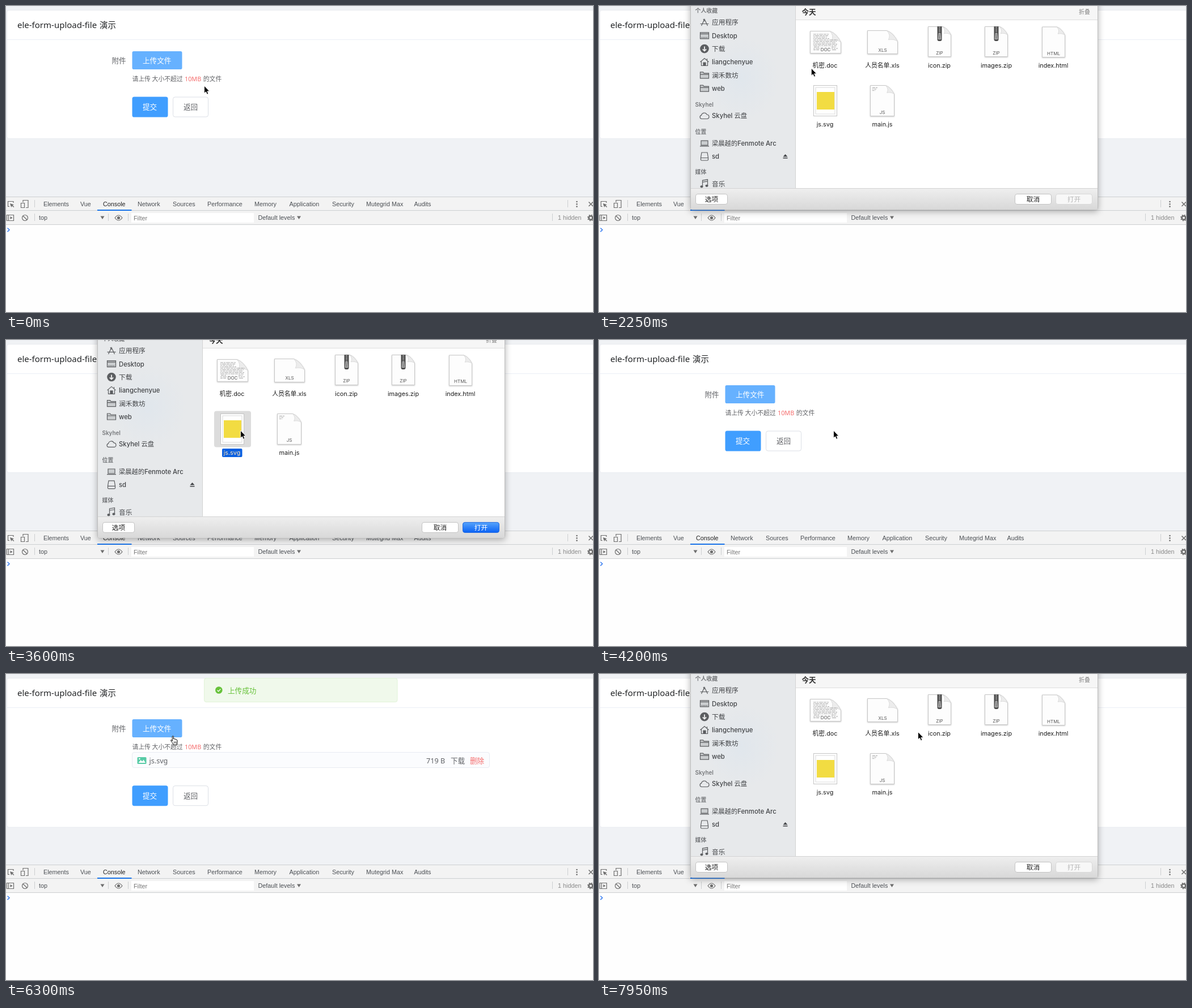
Write an HTML page that moves like this. It is 1035x541 px and loops after 8000 ms.

```html
<!DOCTYPE html>
<html lang="zh">
<head>
<meta charset="utf-8">
<title>ele-form-upload-file</title>
<style>
html, body { margin: 0; width: 100%; height: 100%; overflow: hidden; background: #f0f2f5; }
svg { display: block; width: 100%; height: 100%; }
text { white-space: pre; }
.ui { font: 12.6px "Noto Sans", "Noto Sans CJK SC", sans-serif; fill: #606266; }
.ui .tip { font-size: 10.8px; }
.ui .strong { font-weight: 500; }
.dev { font: 10.8px "Liberation Sans", Arial, sans-serif; fill: #4b4f54; }
.mac { font: 11.3px Inter, "Noto Sans CJK SC", sans-serif; }
.mac .cjk { font-size: 11.7px; }
.mac .head { font-size: 9.9px; font-weight: 600; fill: #77797c; }
.mac .file { font-size: 10.8px; fill: #1c1c1c; text-anchor: middle; }
.mac .kind { font-size: 8px; fill: #555; text-anchor: middle; }
.mac .mid { text-anchor: middle; }
#side { color: #7c7c7c; font-weight: 500; }
#side text:not(.head) { fill: currentColor; }
#side .ico { fill: none; stroke: currentColor; stroke-width: 1.2; }
#sideBg { fill: #f4f4f4; }
#bar { fill: #f5f5f5; }
#body { fill: #fafafa; }
.active #side { color: #434548; }
.active #side .ico { color: #5c5e61; }
.active #sideBg { fill: #e7e9eb; }
.active #bar { fill: url(#barGrad); }
.active #body { fill: #fff; }
#files, #glow { visibility: hidden; }
.active #files, .active #glow { visibility: visible; }
.picked { display: none; }
.chosen .picked { display: inline; }
.chosen .off { display: none; }
</style>
</head>
<body>
<svg viewBox="0 0 1035 541">
  <defs>
    <linearGradient id="barGrad" x2="0" y2="1"><stop stop-color="#efefef"/><stop offset="1" stop-color="#d8d8d8"/></linearGradient>
    <linearGradient id="blue" x2="0" y2="1"><stop stop-color="#56a3fb"/><stop offset="1" stop-color="#0a62f5"/></linearGradient>
    <radialGradient id="haze"><stop stop-color="#dfe6ed" stop-opacity=".8"/><stop offset="1" stop-color="#dfe6ed" stop-opacity="0"/></radialGradient>
  </defs>
  <rect width="1035" height="541" fill="#f0f2f5"/>

  <g class="ui">
    <rect id="card" x="1.5" y="7.5" width="1050" height="227" rx="3.6" fill="#fff" stroke="#e9ebf0"/>
    <path d="M2 59.5H1035" stroke="#ebeef5"/>
    <g fill="#222426">
      <text x="20" y="39.3" font-size="15">ele-form-upload-file</text>
      <text x="165" y="39.3" font-size="14.4">演示</text>
    </g>
    <text x="186.5" y="100.8">附件</text>
    <rect x="222.5" y="80" width="88" height="32" rx="2.8" fill="#66b1ff"/>
    <text x="241" y="100.8" class="strong" fill="#fff">上传文件</text>
    <text x="222.4" y="133" class="tip">请上传 大小不超过</text>
    <text x="315" y="133" class="tip" fill="#f56c6c">10MB</text>
    <text x="347.8" y="133" class="tip">的文件</text>
    <g id="row">
      <rect x="222.5" y="138.5" width="630" height="27" rx="3.6" fill="#fbfcfe" stroke="#e8ebf2"/>
      <rect x="231.5" y="147" width="16" height="12" rx="1.5" fill="#58cba6"/>
      <path d="M233.5 157l4-5 2.6 2.8 2.4-3.4 3.4 5.6z" fill="#fff"/>
      <circle cx="235.4" cy="150" r="1.3" fill="#fff"/>
      <text x="252.5" y="157.6">js.svg</text>
      <text x="741" y="157.6">719 B</text>
      <text x="784" y="157.6">下载</text>
      <text x="818" y="157.6" fill="#f56c6c">删除</text>
    </g>
    <g id="actions">
      <rect x="222.5" y="160.5" width="63" height="36" rx="3.6" fill="#409eff"/>
      <text x="241" y="183.3" class="strong" fill="#fff">提交</text>
      <rect x="294.5" y="161" width="62" height="35" rx="3.6" fill="#fff" stroke="#dcdfe6"/>
      <text x="313" y="183.3" class="strong">返回</text>
    </g>
    <g id="toast">
      <rect x="349.5" y="7.5" width="340.5" height="42" rx="3.6" fill="#f0f9eb" stroke="#e1f3d8"/>
      <circle cx="375.3" cy="28.5" r="6.3" fill="#67c23a"/>
      <path d="M372.4 28.6l2.2 2.2 3.8-4.2" fill="none" stroke="#fff" stroke-width="1.3"/>
      <text x="391" y="33.5" class="strong" fill="#67c23a">上传成功</text>
    </g>
  </g>

  <g class="dev">
    <rect y="337" width="1035" height="50" fill="#f3f3f3"/>
    <rect y="387" width="1035" height="154" fill="#fefefe"/>
    <path d="M0 337.5H1035M0 361.5H1035M0 386.5H1035M50.5 343v13M990.5 343v13M50.5 367v13M180.5 367v13M215.5 367v13M963.5 367v13" stroke="#cdcfd1"/>
    <rect x="161" y="360" width="60.5" height="2" fill="#1a73e8"/>
    <g id="tabs"></g>
    <g fill="none" stroke="#6e6e6e" stroke-width="1.2">
      <path d="M6 354.5H3.5V345.5H13V348M30 347v-3.5h9v13h-4M26.5 348.5h6v8h-6zM1.5 369.5h12v10h-12zM4.5 369.5v10"/>
      <path d="M7 349l2.3 7 1.3-2.6 2.8 2.7 1-1-2.8-2.7 2.4-1.2zM7.5 372l4 2.5-4 2.5z" fill="#6e6e6e" stroke="none"/>
      <circle cx="33.5" cy="374.5" r="5"/><path d="M30 371l7 7"/>
      <path d="M192 374.5q6.5-9 13 0q-6.5 9-13 0z"/><circle cx="198.5" cy="374.5" r="2" fill="#6e6e6e"/>
      <path d="M1027.5 346.5l7.5 7.5m0-7.5l-7.5 7.5" stroke-width="1.5"/>
      <circle cx="1031" cy="374.5" r="3.3" stroke-width="2.4"/>
      <circle cx="1031" cy="374.5" r="5" stroke-width="1.8" stroke-dasharray="2 1.927"/>
    </g>
    <g fill="#6e6e6e">
      <circle cx="1006.5" cy="346" r="1.3"/><circle cx="1006.5" cy="350.3" r="1.3"/><circle cx="1006.5" cy="354.6" r="1.3"/>
      <path d="M166.5 371.5h7l-3.5 5.5zM513 371.5h7l-3.5 5.5z"/>
    </g>
    <text x="58" y="378">top</text>
    <rect x="221" y="366" width="216" height="17" fill="#fff"/>
    <text x="225" y="378.5" fill="#777">Filter</text>
    <text x="444.5" y="378">Default levels</text>
    <text x="973" y="378" fill="#8a8a8a">1 hidden</text>
    <path d="M2.5 392.5l3.5 3.3-3.5 3.3" fill="none" stroke="#367cf1" stroke-width="1.5"/>
  </g>

  <g id="sheet" class="mac">
    <rect x="161.5" y="-20" width="718" height="380" rx="3" fill="#f5f5f5" stroke="#bdbdbd" style="filter:drop-shadow(0 3px 6px rgba(0,0,0,.3))"/>
    <rect id="sideBg" x="162" y="-20" width="184" height="342"/>
    <ellipse id="glow" cx="250" cy="128" rx="68" ry="75" fill="url(#haze)"/>
    <rect id="body" x="346" y="-20" width="533" height="342"/>
    <path id="bar" d="M162 322H879V357q0 3-3 3H165q-3 0-3-3z"/>
    <path d="M162 322.5H879M346.5 0V322" stroke="#d3d3d3"/>
    <g id="side"></g>
    <g id="files"></g>
    <g id="keys"></g>
  </g>

  <g id="cursor" stroke-linejoin="round">
    <path id="arrow" d="M0 0V13.3L3 10.6 5 15.2 7.3 14.2 5.4 9.8H9.4z" fill="#000" stroke="#fff" stroke-width=".9"/>
    <g id="hand" fill="#fff" stroke="#000">
      <path d="M3.2 9.6V1.9Q3.2.6 4.3.6 5.4.6 5.4 1.9V6Q5.6 5.3 6.6 5.4 7.6 5.5 7.7 6.5 8.2 5.9 9 6.1 9.9 6.4 9.9 7.3 10.5 6.9 11.2 7.3 12 7.7 12 8.8V11.5Q12 13 11.2 14.2V16.3H5.2V15Q3.8 13.5 2.6 11.6 1.5 10.1.8 9 .3 8 1 7.6 1.8 7.2 2.6 8.4z"/>
      <path d="M6.3 10.3v3.4M8.2 10.3v3.4M10 10.3v3.4" stroke-width=".7"/>
    </g>
  </g>
</svg>
<script>
const $ = id => document.getElementById(id);
const text = (x, y, s, cls = '', style = '') => `<text x="${x}" y="${y}" class="${cls}" style="${style}">${s}</text>`;
const path = (d, attrs = '') => `<path d="${d}" ${attrs}/>`;

$('tabs').innerHTML = [[66, 'Elements'], [131, 'Vue'], [171, 'Console'], [232, 'Network'], [294, 'Sources'],
  [355, 'Performance'], [438, 'Memory'], [499.5, 'Application'], [575, 'Security'], [635, 'Mutegrid Max'], [719.5, 'Audits']]
  .map(([x, s]) => text(x, 353.5, s, '', s === 'Console' ? 'fill:#222' : '')).join('');

// Sidebar icons, drawn around their own centre
const icons = {
  apps: path('M-5.5 6L0-5.5 5.5 6M-7.5 2.5H7.5M-2-6L0-2'),
  desk: path('M-7.5-5.5h15v11h-15zM-7.5-3h15', 'fill="currentColor" fill-opacity=".2"') + path('M-5.5 3.5h11', 'stroke-dasharray="1.5 1"'),
  down: '<circle r="7.2" fill="currentColor"/>' + path('M0-4V3.5M-3.2.8L0 4 3.2.8', 'stroke="#f1f1f1" stroke-width="1.8"'),
  home: path('M-7.5 0L0-6.5 7.5 0M-5.5-1V6.5h11V-1M4.5-6v3') + path('M-2 6.5V1h4v5.5z', 'fill="currentColor"'),
  folder: path('M-7.5 5.5v-11h5l1.5 2h8.5v9zM-7.5-1.5h15', 'fill="currentColor" fill-opacity=".2"'),
  cloud: path('M-5 5.5a3.2 3.2 0 0 1-.5-6.3a5.2 5.2 0 0 1 9.8-1.2a3.8 3.8 0 0 1 .7 7.5z'),
  laptop: path('M-6-4.5h12v8h-12zM-8 5.2h16', 'fill="currentColor" fill-opacity=".2"'),
  disk: path('M-5-7h10l1.5 9v3.5q0 1.5-1.5 1.5h-10q-1.5 0-1.5-1.5v-3.5zM-6.5 2.5h13'),
  note: path('M-3.5 4.5V-6l9-1.5V3M-3.5-3l9-1.5') + '<ellipse cx="-5" cy="5" rx="2" ry="1.5" fill="currentColor"/><ellipse cx="4" cy="3.5" rx="2" ry="1.5" fill="currentColor"/>'
};
const heads = [[8, '个人收藏'], [174, 'Skyhel'], [222, '位置'], [293.5, '媒体']];
const rows = [[29, 'apps', '应用程序'], [52.3, 'desk', 'Desktop'], [75.6, 'down', '下载'], [99, 'home', 'liangchenyue'],
  [122.3, 'folder', '澜禾数坊'], [145.6, 'folder', 'web'], [194, 'cloud', 'Skyhel 云盘'], [242.6, 'laptop', '梁晨越的Fenmote Arc'],
  [266, 'disk', 'sd'], [314.3, 'note', '音乐']];
$('side').innerHTML = heads.map(([y, s]) => text(169.5, y + 3.7, s, 'head')).join('') +
  rows.map(([y, icon, s]) => `<g class="ico" transform="translate(186 ${y})">${icons[icon]}</g>` +
    text(199, y + 4.3, s, /^[\u4e00-\u9fff]+$/.test(s) ? 'cjk' : '')).join('') +
  path('M324.5 266.5l4-4.5 4 4.5zM324.5 268h8v1.5h-8z', 'fill="currentColor"');

// Sheet of paper with a curled top right corner
function page(x, y, w, h, kind) {
  const f = w * .36;
  return path(`M${x} ${y}h${w - f}q${f * .6} ${f * .2} ${f} ${f}V${y + h}H${x}z`, 'fill="#fdfdfd" stroke="#c6c6c6" style="filter:drop-shadow(0 1px 1px rgba(0,0,0,.2))"') +
    path(`M${x + w - f} ${y}q${f * .4} ${f * .4} ${f * .15} ${f * .85}q${f * .5}-${f * .1} ${f * .85} ${f * .15}q-${f * .4}-${f * .8}-${f}-${f}z`, 'fill="#ececec" stroke="#d2d2d2" stroke-width=".7"') +
    text(x + w / 2, y + h - 4, kind, 'kind');
}
const lines = (x, y, w, n, gap) => Array.from({ length: n }, (_, i) =>
  path(`M${x} ${y + i * gap}h${w - i % 3 * 2}`, `stroke="#a6a6a6" stroke-dasharray="5 1 3 1 7 1" stroke-dashoffset="${i * 7}"`)).join('');
const zipper = x => path(`M${x - 4} 36h8v23q0 3-3 3h-2q-3 0-3-3z`, 'fill="#4c4c4c"') +
  path(`M${x} 37v10`, 'stroke="#bbb" stroke-width="3" stroke-dasharray="1 1.5"') +
  path(`M${x - 1.3} 48h2.6l1 10.500h-4.600z`.replace(/00(?=\D)/g, ''), 'fill="#8a8a8a" stroke="#d0d0d0" stroke-width=".8"');

$('files').innerHTML =
  '<rect x="347" y="-20" width="532" height="44" fill="#f6f6f6"/>' + path('M347 24.5H879', 'stroke="#dedede"') +
  text(357.5, 15.2, '今天', '', 'font-size:12.6px;font-weight:600;fill:#333') +
  text(846, 13.7, '折叠', '', 'font-size:9.9px;fill:#808080') +
  page(372.5, 44.5, 54, 39, '') + lines(378, 50, 28, 4, 2.5) + lines(378, 60, 43, 8, 2.5) +
  '<rect x="389" y="71" width="21" height="9" fill="#fff" fill-opacity=".8"/>' + text(399.5, 79.7, 'DOC', 'kind') +
  page(473.5, 43.5, 53, 41, 'XLS') +
  page(580.5, 36.5, 40, 53, 'ZIP') + zipper(600.5) +
  page(680.5, 36.5, 40, 53, 'ZIP') + zipper(700.5) +
  page(781.5, 37, 40, 53.5, 'HTML') +
  '<rect class="picked" x="367" y="135.5" width="65" height="64" rx="4" fill="#dcdcdc"/>' +
  '<rect x="378.5" y="140.5" width="41" height="54" fill="#fff" stroke="#c4c4c4"/>' +
  '<rect x="382" y="144" width="34" height="47" fill="none" stroke="#dadada"/>' +
  '<rect x="384" y="152" width="31" height="31" fill="#f2dc42"/>' +
  page(478.5, 140.5, 42, 54, 'JS') + lines(482, 144.5, 9, 3, 2.5) +
  '<rect class="picked" x="381" y="202" width="35.5" height="15" rx="2" fill="#0a60e2"/>' +
  [[398.5, '机密.doc'], [499.5, '人员名单.xls'], [600, 'icon.zip'], [700.5, 'images.zip'], [801, 'index.html']]
    .map(([x, s]) => text(x, 109.4, s, 'file')).join('') +
  text(398.5, 213.4, 'js.svg', 'file') + text(398.5, 213.4, 'js.svg', 'file picked', 'fill:#fff') +
  text(499.5, 213.4, 'main.js', 'file');

const key = (x, w, s, cls, fill, edge, ink) =>
  `<g class="${cls}"><rect x="${x}" y="332.5" width="${w}" height="18" rx="3.6" fill="${fill}" stroke="${edge}"/>` +
  text(x + w / 2, 345.9, s, 'cjk mid', `fill:${ink}`) + '</g>';
$('keys').innerHTML = key(170.5, 56, '选项', '', '#fff', '#c3c3c3', '#222') + key(733.5, 64, '取消', '', '#fff', '#c3c3c3', '#222') +
  key(805.5, 64, '打开', 'off', '#f7f7f7', '#d9d9d9', '#b8b8b8') + key(805.5, 64, '打开', 'picked', 'url(#blue)', '#1e68e0', '#fff');

const LOOP = 8000, TICK = 150;
const ease = (t, from, to) => {
  const p = Math.min(1, Math.max(0, (t - from) / (to - from)));
  return p * p * (3 - 2 * p);
};
const within = (t, spans) => spans.some(([a, b]) => t >= a && t < b);
const show = (id, on) => { $(id).style.display = on ? '' : 'none'; };

// Pointer moves: start, end, x, y
const moves = [[750, 1350, 279.5, 96.5], [1800, 1950, 372, 107], [2100, 3150, 413.5, 160], [5400, 5550, 411.5, 159.5],
  [5550, 5850, 824, 142], [5850, 6300, 290, 109], [6750, 7050, 306, 104.5], [7050, 7650, 540.5, 118.5], [7800, 7950, 562.5, 102.5]];
const handSpans = [[1200, 2250], [5850, 6000], [6300, 7200]];

function draw(t) {
  let x = 349.5, y = 141;
  for (const [a, b, nx, ny] of moves) {
    const p = ease(t, a, b);
    x += (nx - x) * p;
    y += (ny - y) * p;
  }
  const hand = within(t, handSpans);
  $('cursor').setAttribute('transform', `translate(${x} ${y})`);
  show('hand', hand);
  show('arrow', !hand);

  const open = ease(t, 1895, 2195) - ease(t, 3570, 3870) + ease(t, 6820, 7120);
  const active = within(t, [[2250, 3900], [7200, LOOP]]);
  const chosen = within(t, [[3300, 3900]]);
  show('sheet', open > .001);
  $('sheet').setAttribute('transform', `translate(0 ${(open - 1) * 360})`);
  $('sheet').setAttribute('class', `mac${active ? ' active' : ''}${chosen ? ' chosen' : ''}`);

  const done = t >= 4950;
  const toast = ease(t, 4850, 5250), row = ease(t, 4850, 5400);
  $('card').setAttribute('height', done ? 263.5 : 227);
  $('actions').setAttribute('transform', `translate(0 ${done ? 36.7 : 0})`);
  show('toast', done);
  show('row', done);
  $('toast').setAttribute('opacity', toast);
  $('toast').setAttribute('transform', `translate(0 ${(toast - 1) * 43})`);
  $('row').setAttribute('opacity', row);
  $('row').setAttribute('transform', `translate(0 ${(row - 1) * 27})`);
}

const start = performance.now();
function frame() {
  const t = (performance.now() - start) % LOOP;
  draw(Math.floor(t / TICK) * TICK);
  requestAnimationFrame(frame);
}
frame();
</script>
</body>
</html>
```
